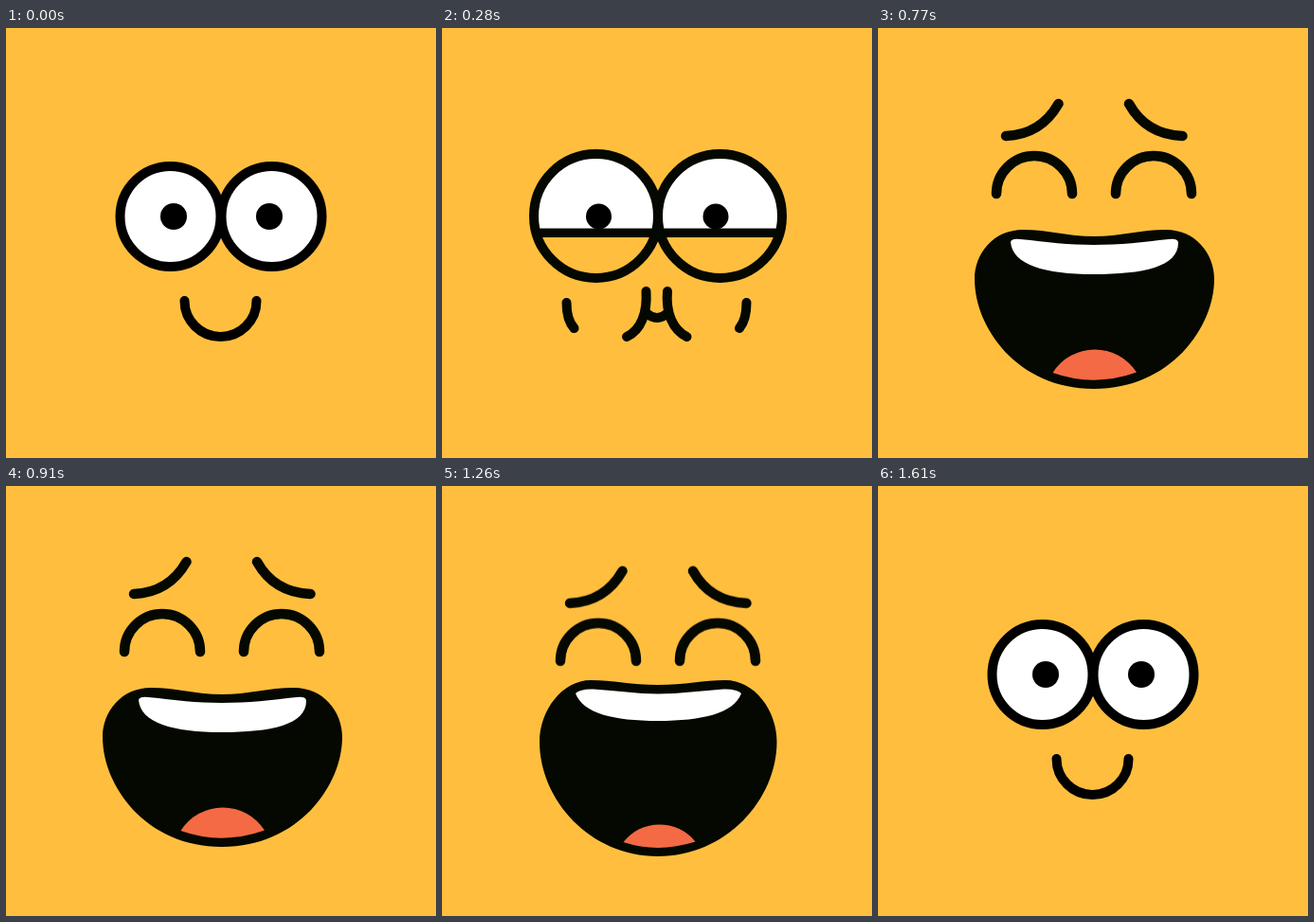
An HTML page for the animation above (1960 ms loop, 454 by 454 pixels).

```html
<!DOCTYPE html>
<html lang="en">
<head>
<meta charset="utf-8">
<title>Holding back a laugh</title>
<style>
  @property --k { syntax: "<number>"; inherits: true; initial-value: 0; }

  html, body { margin: 0; width: 100%; height: 100%; overflow: hidden; background: #ffbe3e; }
  svg { display: block; width: 100%; height: 100%; color: #040800; animation: hold 1960ms -.1ms infinite; }
  .line { fill: none; stroke: currentColor; stroke-width: 10; stroke-linecap: round; }
  .calm, .laugh { animation: calm 1960ms -.1ms step-end infinite; }
  .laugh { animation-name: laugh; }

  /* --k runs from 0 (smiling) to 1 (cheeks full) */
  .eye, .pupil { cx: calc(var(--x) + var(--dx) * var(--k)); cy: calc(199px - .5px * var(--k)); }
  .eye { r: calc(53px + 12.5px * var(--k)); }
  .pupil { cy: 199px; r: calc(14px - .5px * var(--k)); }
  .el { --x: 173.5px; --dx: -11px; }
  .er { --x: 280.5px; --dx: 13px; }
  .pl { --x: 177px; --dx: -11.5px; }
  .pr { --x: 278px; --dx: 11px; }
  .lid { fill: #ffbe3e; stroke: currentColor; stroke-width: 9.5; transform: translateY(calc(50px * (1 - var(--k)))); }
  .grow { stroke-dasharray: 1 2; stroke-dashoffset: calc(1.1 * (1 - var(--k))); }
  .smile { animation: smile 1960ms -.1ms infinite; }

  /* the laugh flips between two poses every 70 ms */
  .bob, .wide, .tall { animation: bob 140ms -.1ms step-end infinite; }
  .bob { stroke-width: 10.5; }
  .wide { animation-name: wide; }
  .tall { animation-name: tall; }

  @keyframes hold {
    0% { --k: 0; color: #000; animation-timing-function: steps(4); }
    14.2857%, 82.1428% { --k: 1; color: #040800; animation-timing-function: step-end; }
    82.1429%, 100% { --k: 0; color: #000; }
  }
  @keyframes smile {
    0%, 82.1429%, 100% {
      d: path("M188.5 288C188.5 309 205.5 326 226.5 326S264.5 309 264.5 288");
      animation-timing-function: steps(4);
    }
    14.2857%, 82.1428% {
      d: path("M216 301C219 304 223 306 227 306S235 304 238 301");
      animation-timing-function: step-end;
    }
  }
  @keyframes calm { 0%, 82.1429%, 100% { opacity: 1; } 32.1429% { opacity: 0; } }
  @keyframes laugh { 0%, 82.1429%, 100% { opacity: 0; } 32.1429% { opacity: 1; } }
  @keyframes bob { 0%, 100% { transform: translateY(9.7px); } 50% { transform: none; } }
  @keyframes wide { 0%, 100% { opacity: 0; } 50% { opacity: 1; } }
  @keyframes tall { 0%, 100% { opacity: 1; } 50% { opacity: 0; } }
</style>
</head>
<body>
<svg viewBox="0 0 454 454">
  <clipPath id="eyes">
    <circle class="eye el"/>
    <circle class="eye er"/>
  </clipPath>

  <g class="calm">
    <g fill="#fff">
      <circle class="eye el"/>
      <circle class="eye er"/>
    </g>
    <circle class="pupil pl"/>
    <circle class="pupil pr"/>
    <g clip-path="url(#eyes)">
      <rect class="lid" x="80" y="216.3" width="294" height="90"/>
    </g>
    <g class="line">
      <circle class="eye el"/>
      <circle class="eye er"/>
      <path class="smile" d="M188.5 288C188.5 309 205.5 326 226.5 326S264.5 309 264.5 288"/>
      <g class="grow">
        <path pathLength="1" d="M215.5 278C217 301 210 319 195 326"/>
        <path pathLength="1" d="M238 278C236 301 244 319 258.5 326"/>
        <path pathLength="1" d="M131.5 290C131.5 301 134 311 139.5 317"/>
        <path pathLength="1" d="M321.5 290C321.5 301 319 311 314 317"/>
      </g>
    </g>
  </g>

  <g class="laugh">
    <g class="line bob">
      <path d="M190.5 80Q172 112.5 135 114"/>
      <path d="M265 80Q283 112.5 321.5 114"/>
      <path d="M125 175a40 40 0 0 1 80 0"/>
      <path d="M251 175a40 40 0 0 1 80 0"/>
    </g>
    <g class="wide">
      <path fill="currentColor" d="M228 220C200 220 180 213 153 213C122 213 102 238 102 265C102 316 147 381 228 381S355 316 355 265C355 238 335 213 304 213C277 213 256 220 228 220"/>
      <path fill="#fff" d="M140 226Q141 222 150 223C180 226 200 229 228 229S280 226 307 223Q317 222 317 227C317 252 280 260 228 260S142 250 140 226"/>
      <path fill="#f46a44" d="M184.5 364A52.5 52.5 0 0 1 273 363.5Q228 379.5 184.5 364"/>
    </g>
    <g class="tall">
      <path fill="currentColor" d="M228 210C200 210 180 205 157 205C127 205 103 237 103 270C103 331 156 391 228 391S353.5 331 353.5 270C353.5 237 330 205 299 205C277 205 256 210 228 210"/>
      <path fill="#fff" d="M141 219Q146 214 160 214.5C185 216 205 219.5 228 219.5S275 216 297 214.5Q311 214 316 219C308 240 275 248 228 248S149 240 141 219"/>
      <path fill="#f46a44" d="M191.5 376A48.5 48.5 0 0 1 267.5 375.5Q228 388 191.5 376"/>
    </g>
  </g>
</svg>
</body>
</html>
```
